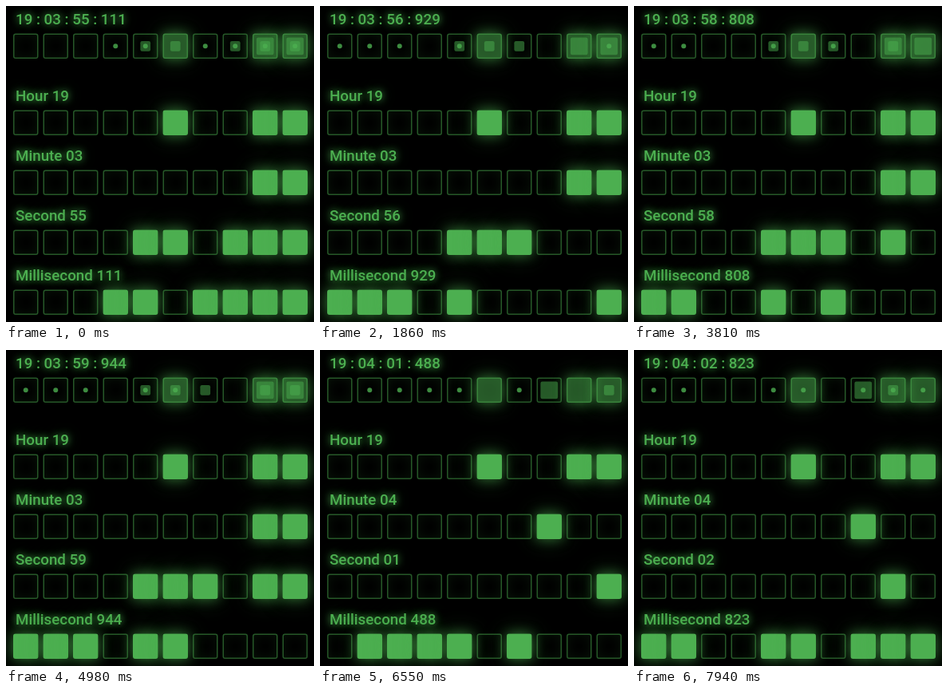
An HTML page for the animation above (8 s loop, 386x396 px).

```html
<!DOCTYPE html>
<html lang="en">
<head>
<meta charset="utf-8">
<title>Binary clock</title>
<style>
  html, body { margin: 0; width: 100%; height: 100%; overflow: hidden; background: #000; }
  #stage {
    position: absolute; left: 0; top: 0; width: 515px; height: 528px;
    transform: scale(.75); transform-origin: 0 0;
    --green: #4caf50;
    --glow: 0 0 20px rgba(76, 175, 80, .55), 0 0 40px rgba(76, 175, 80, .35);
    font: 500 25px/32px Roboto, "Open Sans", sans-serif;
    color: var(--green);
  }
  .row { position: absolute; left: 0; width: 515px; height: 100px; }
  .label {
    position: absolute; left: 16px; top: 7px; white-space: pre;
    text-shadow: 0 0 13px var(--green), 0 0 26px rgba(76, 175, 80, .4);
  }
  .cell {
    position: absolute; top: 46px; width: 42px; height: 42px; box-sizing: border-box;
    border: 2px solid rgba(76, 175, 80, .5); border-radius: 4px;
    box-shadow: inset 0 0 20px rgba(76, 175, 80, .1);
  }
  .plain .cell.on { background: var(--green); box-shadow: var(--glow); }
  .layer {
    position: absolute; left: 50%; top: 50%; width: var(--size); height: var(--size);
    transform: translate(-50%, -50%); border-radius: 3px;
    background: rgba(76, 175, 80, .5); visibility: hidden;
  }
  .layer.on { visibility: visible; }
  .hour { --size: 42px; border-radius: 4px; box-shadow: var(--glow); }
  .minute { --size: 29px; }
  .second { --size: 17px; }
  .milli { --size: 8px; border-radius: 50%; background: rgba(76, 175, 80, .8); }
</style>
</head>
<body>
<div id="stage"></div>
<script>
const BITS = 10, LOOP = 8000, TICKS = 116, LEAD = 4;
const CLOCK_START = (19 * 3600 + 3 * 60 + 55) * 1000;
const UNITS = ["hour", "minute", "second", "milli"];
const NAMES = ["Hour", "Minute", "Second", "Millisecond"];

// Key points of the slightly uneven clock: [tick, reading in ms]
const READINGS = [
  [0, 111], [16, 1176], [37, 2613], [55, 3808], [72, 4944], [95, 6488], [115, 7823]
];

function interpolate(points, x) {
  const i = Math.max(1, points.findIndex(p => p[0] >= x));
  const [x0, y0] = points[i - 1], [x1, y1] = points[i];
  return y0 + (y1 - y0) * (x - x0) / (x1 - x0);
}

function add(parent, className) {
  const node = document.createElement("div");
  node.className = className;
  return parent.appendChild(node);
}

function makeRow(top, className) {
  const row = add(document.getElementById("stage"), "row " + className);
  row.style.top = top + "px";
  const label = add(row, "label");
  const cells = Array.from({ length: BITS }, (_, i) => {
    const cell = add(row, "cell");
    cell.style.left = 12 + 50 * i + "px";
    return cell;
  });
  return { label, cells };
}

const summary = makeRow(0, "stacked");
const layers = summary.cells.map(cell => UNITS.map(unit => add(cell, "layer " + unit)));
const rows = UNITS.map((_, i) => makeRow(128 + 100 * i, "plain"));

function show(clock) {
  const seconds = Math.floor(clock / 1000);
  const values = [
    Math.floor(seconds / 3600), Math.floor(seconds / 60) % 60, seconds % 60, clock % 1000
  ];
  const texts = values.map((v, i) => String(v).padStart(UNITS[i] === "milli" ? 3 : 2, "0"));
  summary.label.textContent = texts.join(" : ");
  values.forEach((value, u) => {
    rows[u].label.textContent = NAMES[u] + " " + texts[u];
    for (let i = 0; i < BITS; i++) {
      const on = Boolean(value >> (BITS - 1 - i) & 1);
      rows[u].cells[i].classList.toggle("on", on);
      layers[i][u].classList.toggle("on", on);
    }
  });
}

const start = performance.now();
let shown = -1;
function draw() {
  const time = (performance.now() - start) % LOOP;
  const tick = Math.min(TICKS - 1, Math.floor((time + LEAD) * TICKS / LOOP));
  if (tick !== shown) {
    shown = tick;
    show(CLOCK_START + Math.round(interpolate(READINGS, tick)));
  }
  requestAnimationFrame(draw);
}
draw();
</script>
</body>
</html>
```
